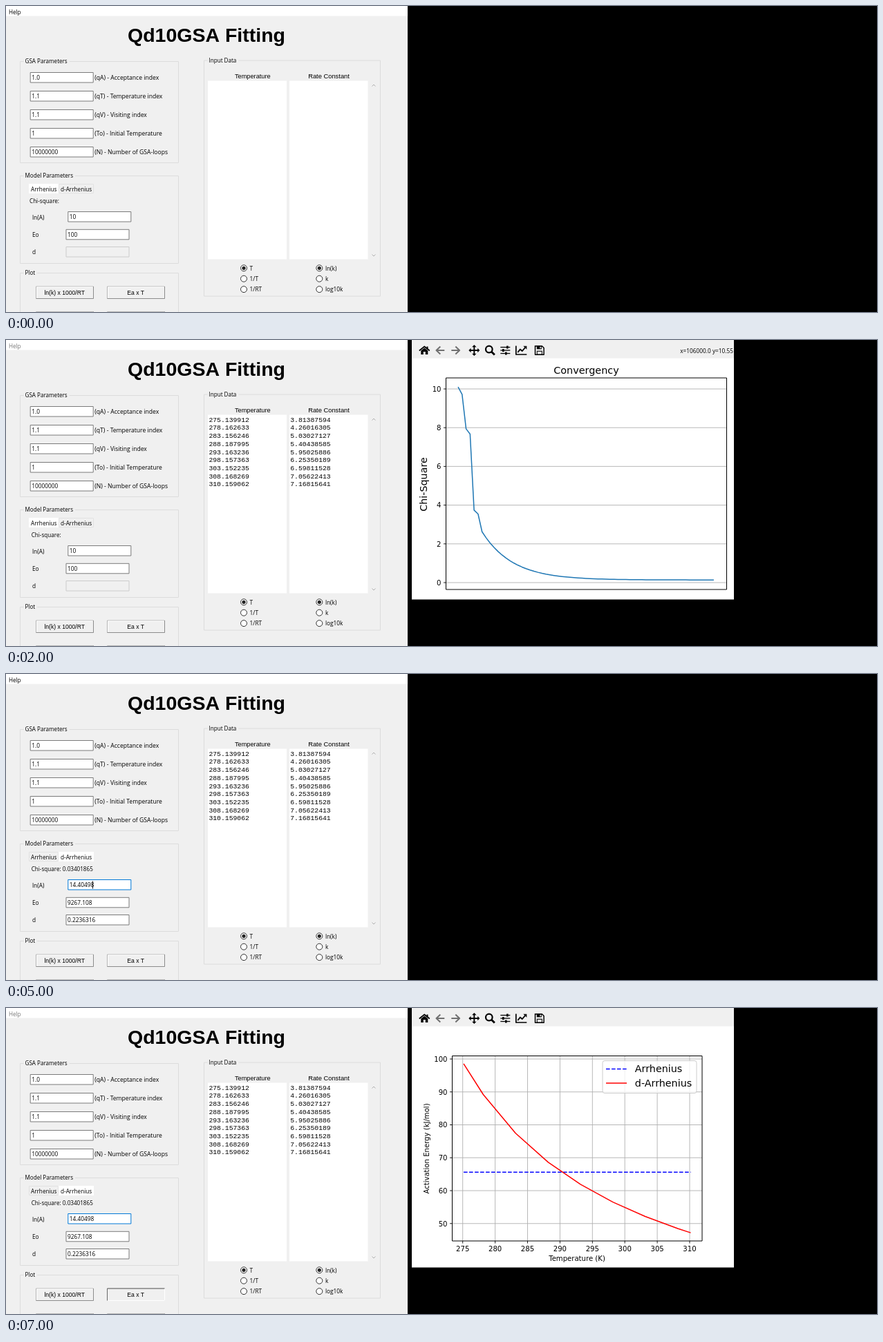
An HTML page with a canvas that plays this animation: 1260x444 px, repeating every 8 s.

```html
<!DOCTYPE html>
<html lang="en">
<head>
<meta charset="utf-8">
<title>Curve fitting tool</title>
<style>
html, body { margin: 0; width: 100%; height: 100%; overflow: hidden; background: #000; }
canvas { display: block; }
</style>
</head>
<body>
<canvas id="stage" width="1260" height="444"></canvas>
<script>
const ctx = document.getElementById('stage').getContext('2d');
const UI = '"Open Sans", "Noto Sans", sans-serif';
const ARIAL = '"Liberation Sans", Arial, sans-serif';
const MONO = '"Liberation Mono", "Courier New", monospace';
const PLOT = '"DejaVu Sans", sans-serif';
const BLUE = '#1f77b4', GRID = '#b0b0b0', PANEL = '#f0f0f0';

// Measured data, shown as text and used by the plots
const temps = [275.139912, 278.162633, 283.156246, 288.187995, 293.163236,
  298.157363, 303.152235, 308.168269, 310.159062];
const rates = [3.81387594, 4.26016305, 5.03027127, 5.40438585, 5.95025886,
  6.25350189, 6.59811528, 7.05622413, 7.16815641];

// Fitted models
const R = 8.314;
const arr = { lnA: 32.70201, E: 65616.27 };
const dArr = { lnA: 14.40498, E: 9267.108, d: 0.2236316 };
const dTerm = T => 1 - dArr.d * dArr.E / (R * T);
const lnkArr = T => arr.lnA - arr.E / (R * T);
const lnkDArr = T => dArr.lnA + Math.log(dTerm(T)) / dArr.d;
const energy = T => dArr.E / dTerm(T) / 1000;

// First search: a few big drops, then exponential decay
const drops = [10.1, 9.72, 7.94, 7.67, 3.74, 3.54];
const coarseChi = i => i < drops.length ? drops[i] : 0.135 + 2.49 * Math.exp((6 - i) / 7.6);

// Second search: chi-square over progress in plot pixels
const fineKeys = [[0, 0.137], [7, 0.128], [19, 0.1203], [31, 0.109], [39, 0.1026],
  [56, 0.0978], [81, 0.085], [109, 0.0755], [139, 0.061], [164, 0.0508],
  [194, 0.0452], [231, 0.0396], [278, 0.0358], [315, 0.0345], [361, 0.0341]];

function fineChi(t) {
  const i = Math.max(1, fineKeys.findIndex(k => k[0] >= t));
  const [t0, v0] = fineKeys[i - 1], [t1, v1] = fineKeys[i];
  return v0 + (v1 - v0) * (t - t0) / (t1 - t0);
}

function randomizer(seed) {
  return () => (seed = seed * 16807 % 2147483647) / 2147483647;
}

function rect(x, y, w, h, fill) {
  ctx.fillStyle = fill;
  ctx.fillRect(x, y, w, h);
}

function frame(x, y, w, h, color) {
  ctx.strokeStyle = color;
  ctx.lineWidth = 1;
  ctx.strokeRect(x, y, w, h);
}

function text(s, x, y, size = 8.3, font = UI, align = 'left', color = '#000', weight = '') {
  ctx.font = `${weight} ${size}px ${font}`;
  ctx.textAlign = align;
  ctx.fillStyle = color;
  ctx.fillText(s, x, y);
}

function sideText(s, x, y, size) {
  ctx.save();
  ctx.translate(x, y);
  ctx.rotate(-Math.PI / 2);
  text(s, 0, 0, size, PLOT, 'center');
  ctx.restore();
}

function path(pts) {
  ctx.beginPath();
  for (let i = 0; i < pts.length; i += 2) ctx.lineTo(pts[i], pts[i + 1]);
}

function line(pts, color, width = 1, dash = []) {
  path(pts);
  ctx.strokeStyle = color;
  ctx.lineWidth = width;
  ctx.lineJoin = 'round';
  ctx.setLineDash(dash);
  ctx.stroke();
  ctx.setLineDash([]);
}

function poly(pts, color) {
  path(pts);
  ctx.fillStyle = color;
  ctx.fill();
}

function circle(x, y, r, fill, stroke) {
  ctx.beginPath();
  ctx.arc(x, y, r, 0, 7);
  if (fill) { ctx.fillStyle = fill; ctx.fill(); }
  if (stroke) { ctx.strokeStyle = stroke; ctx.stroke(); }
}

function group(title, x, y, w, h) {
  frame(x, y, w, h, '#dcdcdc');
  ctx.font = '8.1px ' + UI;
  rect(x + 5, y - 2, ctx.measureText(title).width + 5, 4, PANEL);
  text(title, x + 7, y + 2.8, 8.1);
}

function entry(value, x, y, border = '#7a7a7a', fill = '#fff') {
  rect(x, y, 91, 14.5, fill);
  frame(x, y, 91, 14.5, border);
  text(value, x + 2, y + 10.8, 8.3);
}

function radio(label, x, y, on) {
  ctx.lineWidth = 1;
  circle(x, y, 4.5, '#fff', '#333');
  if (on) circle(x, y, 2.6, '#222');
  text(label, x + 8.6, y + 3.3);
}

function button(label, x, y, pressed) {
  const w = 83, h = 17.5;
  const topLeft = [x, y + h, x, y, x + w, y];
  const bottomRight = [x, y + h, x + w, y + h, x + w, y];
  frame(x, y, w, h, '#b4b4b4');
  line(pressed ? bottomRight : topLeft.map((v, i) => v + (i === 1 ? -1 : i === 4 ? -1 : 1)), '#fff');
  line(pressed ? topLeft : bottomRight, pressed ? '#696969' : '#8c8c8c');
  text(label, x + w / 2 - 0.3, y + 12, 8.6, ARIAL, 'center');
}

function tab(label, x, w, on) {
  rect(x, 258, w, 14, on ? '#fff' : PANEL);
  if (!on) frame(x + 0.5, 258.5, w - 1, 13, '#e2e2e2');
  text(label, x + 3, 269.2, 8.2);
}

function mainWindow(s) {
  rect(0, 0, 581, 444, PANEL);
  rect(0, 0, 581, 14.5, '#fff');
  text('Help', 4, 12, 8.1, UI, 'left', s.plot ? '#777' : '#000');
  text('Qd10GSA Fitting', 176, 52.3, 28.5, ARIAL, 'left', '#000', 'bold');

  group('GSA Parameters', 20.5, 80.5, 229, 147);
  [['1.0', '(qA) - Acceptance index'], ['1.1', '(qT) - Temperature index'],
   ['1.1', '(qV) - Visiting index'], ['1', '(To) - Initial Temperature'],
   ['10000000', '(N) - Number of GSA-loops']].forEach(([v, label], i) => {
    entry(v, 35.2, 96.5 + 27 * i);
    text(label, 128.3, 107.3 + 27 * i, 8.6);
  });

  group('Model Parameters', 20.5, 246.5, 229, 127);
  tab('Arrhenius', 33, 43, !s.dTab);
  tab('d-Arrhenius', 76, 51, s.dTab);
  text('Chi-square: ' + s.chi, s.data ? 36.7 : 34, 286, 8.15);
  text('ln(A)', 38, 309.5);
  text('Eo', 38, 335);
  text('d', 38, 360.3);
  entry(s.values[0], 89.8, 298.5, s.dTab ? '#0078d7' : '#7a7a7a');
  entry(s.values[1], 87, 324.3);
  if (s.dTab) entry(s.values[2], 87, 349.5);
  else entry('', 87, 349.5, '#ccc', PANEL);
  if (s.selected) {
    rect(91, 300, 34, 12, '#0078d7');
    text(s.values[0], 91.8, 309.3, 8.3, UI, 'left', '#fff');
  }
  if (s.caret) rect(125, 300.5, 0.9, 11, '#000');

  group('Plot', 20.5, 387.5, 229, 100);
  button('ln(k) x 1000/RT', 43.5, 407, s.plot === 'rate');
  button('Ea x T', 146.5, 407, s.plot === 'energy');
  button('', 43.5, 443.5);
  button('', 146.5, 443.5);

  group('Input Data', 286.5, 79, 255, 342);
  text('Temperature', 356.8, 105, 9.2, ARIAL, 'center');
  text('Rate Constant', 467, 105, 9.35, ARIAL, 'center');
  rect(292, 108.5, 114, 259, '#fff');
  rect(410, 108.5, 113.5, 259, '#fff');
  line([529.5, 116.5, 532, 114, 534.5, 116.5], '#b0b0b0');
  line([529.5, 360.5, 532, 363, 534.5, 360.5], '#b0b0b0');
  if (s.data) temps.forEach((T, i) => {
    const y = 118.8 + 11.68 * i;
    text(T.toFixed(6), 293.4, y, 9.75, MONO);
    text(rates[i].toFixed(8), 411.2, y, 9.75, MONO);
  });
  ['T', '1/T', '1/RT'].forEach((l, i) => radio(l, 344, 380.3 + 15.4 * i, !i));
  ['ln(k)', 'k', 'log10k'].forEach((l, i) => radio(l, 453.3, 380.3 + 15.4 * i, !i));
}

// Toolbar icons, each drawn around its own centre
function arrow(dir) {
  line([-6 * dir, 0, 5 * dir, 0], '#707070', 2);
  line([0, -5.5, 5.8 * dir, 0, 0, 5.5], '#707070', 2);
}

const icons = [
  [18, () => {
    line([-7.5, 0.5, 0, -5.5, 7.5, 0.5], '#000', 1.8);
    poly([-5, 0.5, 0, -3.5, 5, 0.5, 5, 6, -5, 6], '#000');
    rect(-1.5, 2, 3, 4, PANEL);
    rect(3.2, -5.5, 2, 4, '#000');
  }],
  [41, () => arrow(-1)],
  [63, () => arrow(1)],
  [90, () => {
    ctx.save();
    for (let i = 0; i < 4; i++) {
      line([0, 0, 6, 0], '#000', 1.9);
      poly([8, 0, 4.8, -3.2, 4.8, 3.2], '#000');
      ctx.rotate(Math.PI / 2);
    }
    ctx.restore();
  }],
  [112.5, () => {
    ctx.lineWidth = 2.2;
    circle(-1, -1.5, 4.8, null, '#000');
    line([2.5, 2, 7, 6.5], '#000', 2.8);
  }],
  [135, () => [3, -3, 1].forEach((k, i) => {
    const y = 4.5 * (i - 1);
    line([-7, y, 7, y], '#000', 1.3);
    rect(k - 1.3, y - 2, 2.6, 4, '#000');
  })],
  [158, () => {
    line([-7.5, -6.5, -7.5, 6, 8, 6], '#000', 1.7);
    line([-5, 3, -1.5, -1.5, 1.5, 1, 6.5, -5], '#000', 1.9);
    poly([3, -6.3, 8, -6.3, 8, -1.3], '#000');
  }],
  [184.5, () => {
    line([-6.3, -6.3, 3.5, -6.3, 6.3, -3.5, 6.3, 6.3, -6.3, 6.3, -6.3, -7], '#000', 1.5);
    rect(-4, -6.5, 7, 4.8, '#000');
    rect(0.5, -5.4, 1.5, 2.6, PANEL);
    rect(-4, 0.7, 8, 5.3, '#000');
    rect(-3, 1.8, 6, 3.6, PANEL);
  }]
];

function plotWindow(x) {
  rect(x, 0, 466, 376.5, '#fff');
  rect(x, 0, 466, 26.5, PANEL);
  for (const [dx, draw] of icons) {
    ctx.save();
    ctx.translate(x + dx + 0.3, 15);
    draw();
    ctx.restore();
  }
}

// Ticks are [label, position] pairs
function axes(x0, y0, x1, y1, yTicks, xTicks, curves) {
  yTicks.forEach(([, y]) => line([x0, y, x1, y], GRID, 0.9));
  xTicks.forEach(([, x]) => line([x, y0, x, y1], GRID, 0.9));
  curves();
  frame(x0, y0, x1 - x0, y1 - y0, '#000');
  yTicks.forEach(([label, y]) => {
    line([x0 - 3.5, y, x0, y], '#000', 0.9);
    text(label, x0 - 7, y + 3.8, 10.1, PLOT, 'right');
  });
  xTicks.forEach(([label, x]) => {
    line([x, y1, x, y1 + 3.5], '#000', 0.9);
    text(label, x, y1 + 15, 10.1, PLOT, 'center');
  });
}

function ticks(from, step, count, digits, pos) {
  return Array.from({ length: count }, (_, i) => {
    const v = from + step * i;
    return [v.toFixed(digits), pos(v)];
  });
}

function convergency(x, left, yTicks, pts) {
  plotWindow(x);
  const right = x + 455.5;
  text('Convergency', (left + right) / 2, 48.7, 14.4, PLOT, 'center');
  sideText('Chi-Square', x + 22, 209.5, 14.3);
  axes(left, 55, right, 362, yTicks, [], () => line(pts, BLUE, 1.5));
}

function modelPlot(x, xLabel, yLabel, xTicks, yTicks, curves) {
  plotWindow(x);
  axes(x + 58.5, 69.5, x + 420, 338, yTicks, xTicks, curves);
  legend(x + 276);
  text(xLabel, x + 239, 367, 10.1, PLOT, 'center');
  sideText(yLabel, x + 25, 204, 10.1);
}

const arrLine = pts => line(pts, '#00f', 1.5, [5.6, 2.4]);
const dArrLine = pts => line(pts, '#f00', 1.5);
const curve = (px, py, f) => temps.flatMap(T => [px(T), py(f(T))]);

function legend(x) {
  ctx.beginPath();
  ctx.roundRect(x, 76.5, 136, 47, 3);
  ctx.fillStyle = 'rgba(255,255,255,0.8)';
  ctx.fill();
  ctx.strokeStyle = '#ccc';
  ctx.lineWidth = 1;
  ctx.stroke();
  arrLine([x + 5, 88.5, x + 35, 88.5]);
  dArrLine([x + 5, 109, x + 35, 109]);
  text('Arrhenius', x + 46.8, 93.4, 14.3, PLOT);
  text('d-Arrhenius', x + 46.8, 114.3, 14.3, PLOT);
}

const plots = {
  coarse() {
    const py = v => 352 - 28.1 * v, pts = [];
    for (let i = 0; i <= 64; i++) pts.push(654 + 5.78 * i, py(coarseChi(i)));
    convergency(587, 636.5, ticks(0, 2, 6, 0, py), pts);
    text('x=106000.0 y=10.55', 1052, 18.5, 8.3, UI, 'right');
  },
  fine() {
    const py = v => 332 - (v - 0.04) * 2715, pts = [];
    const random = randomizer(7);
    // Uneven progress gives the small steps
    for (let t = 0; t <= 361; t += 2) {
      const late = Math.min(361, t + random() * 2);
      pts.push(664.8 + t, py(fineChi(late)));
    }
    convergency(588.5, 647.5, ticks(0.04, 0.02, 6, 2, py), pts);
  },
  rate() {
    const px = T => 665.5 + (1000 / (R * T) - 0.38779) * 6650;
    const py = v => 326 - (v - 3.814) * 72.7;
    modelPlot(590.5, '1000/RT', 'ln(k)',
      ticks(0.39, 0.01, 5, 2, v => px(1000 / (R * v))), ticks(4, 1, 4, 0, py), () => {
        arrLine(curve(px, py, lnkArr));
        dArrLine(curve(px, py, lnkDArr));
        temps.forEach((T, i) => circle(px(T), py(rates[i]), 3, '#000'));
      });
  },
  energy() {
    const px = T => 660.7 + (T - 275) * 9.38;
    const py = v => 74 + (100 - v) * 4.775;
    modelPlot(587, 'Temperature (K)', 'Activation Energy (kJ/mol)',
      ticks(275, 5, 8, 0, px), ticks(50, 10, 6, 0, py), () => {
        arrLine(curve(px, py, () => arr.E / 1000));
        dArrLine(curve(px, py, energy));
      });
  }
};

const start = { values: ['10', '100', ''], chi: '' };
const loaded = { ...start, data: true };
const guess = { ...loaded, dTab: true, selected: true, values: ['32.70201', '65616.27', '0.001'] };
const fitted = { ...guess, selected: false, values: ['14.40498', '9267.108', '0.2236316'], chi: '0.03401865' };
const steps = [
  start,
  loaded,
  { ...loaded, plot: 'coarse' },
  guess,
  { ...guess, plot: 'fine' },
  { ...fitted, caret: true },
  { ...fitted, plot: 'rate' },
  { ...fitted, plot: 'energy' }
];

function draw() {
  const s = steps[Math.floor(performance.now() % 8000 / 1000)];
  rect(0, 0, 1260, 444, '#000');
  mainWindow(s);
  if (s.plot) plots[s.plot]();
  requestAnimationFrame(draw);
}
draw();
</script>
</body>
</html>
```
